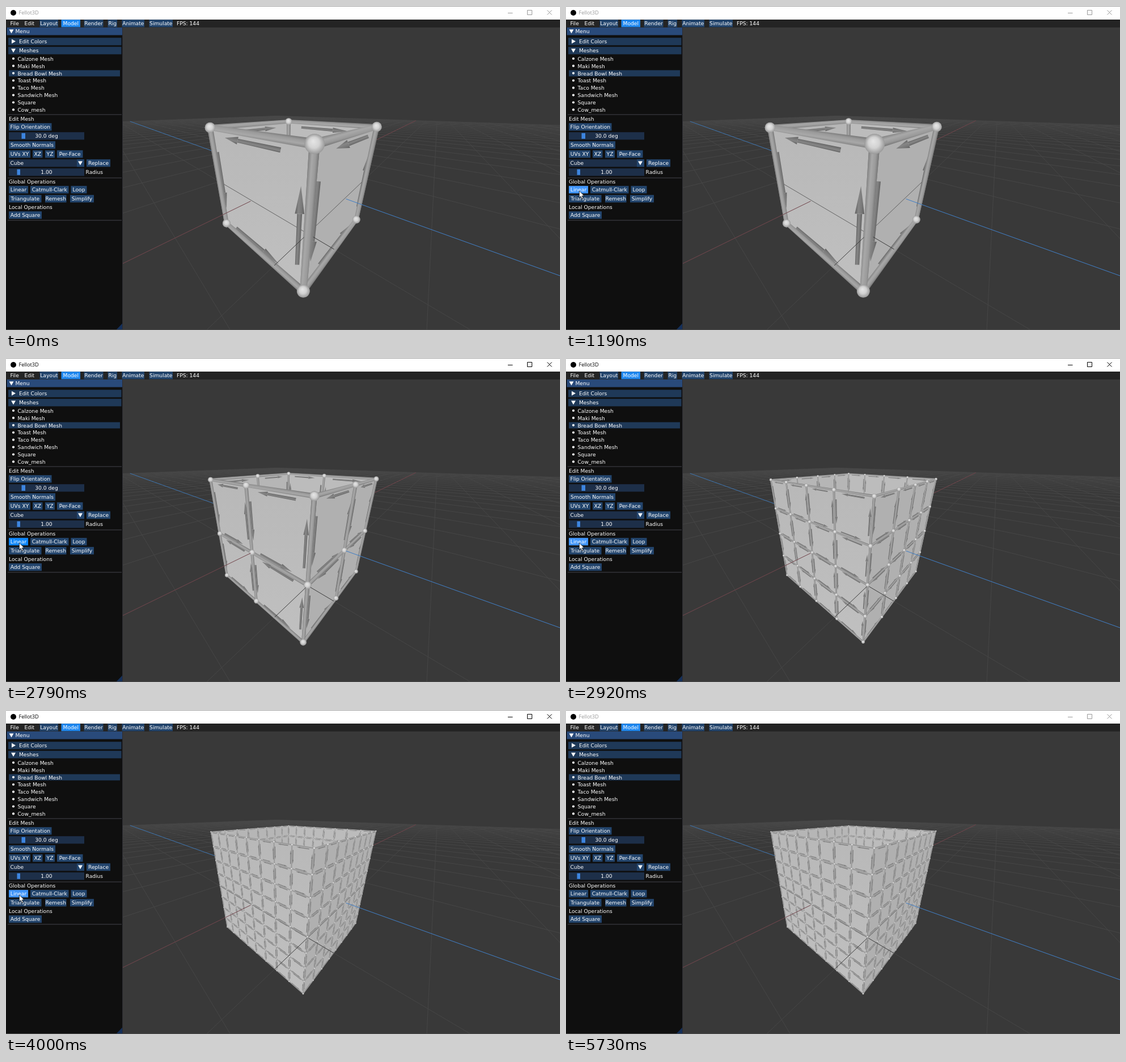
An HTML page with a canvas that plays this animation: 977 by 573 pixels, repeating every 5790 ms.

```html
<!DOCTYPE html>
<html lang="en">
<head>
<meta charset="utf-8">
<title>Mesh editor</title>
<style>
html, body { margin: 0; width: 100%; height: 100%; overflow: hidden; background: #393939; }
canvas { display: block; }
</style>
</head>
<body>
<canvas id="stage" width="977" height="573"></canvas>
<script>
const W = 977, H = 573, LOOP = 5790;
const view = document.getElementById('stage').getContext('2d');
let g = view;

// ---------- projection ----------
const ORIGIN = [507.4, 308], A_END = [761, 184], B_END = [163, 184], UP_END = [489, 964];
const KA = -0.226, KB = -0.207, KH = -0.125, UNIT = 91.5, REACH = 25;

const depth = (a, b, h = 0) => 1 + KA * a + KB * b + KH * h;

function project(a, b, h = 0) {
  const d = depth(a, b, h);
  const at = i => (ORIGIN[i] + KA * a * A_END[i] + KB * b * B_END[i] + KH * h * UP_END[i]) / d;
  return { x: at(0), y: at(1), k: UNIT / d };
}

// Adds a floor line to the path, cut off in front of the camera.
function floorLine(a0, b0, a1, b1) {
  const near = 0.06, d0 = depth(a0, b0), d1 = depth(a1, b1);
  if (d0 < near && d1 < near) return;
  const cut = (near - d0) / (d1 - d0);
  const at = t => project(a0 + (a1 - a0) * t, b0 + (b1 - b0) * t);
  const p = at(d0 < near ? cut : 0), q = at(d1 < near ? cut : 1);
  g.moveTo(p.x, p.y);
  g.lineTo(q.x, q.y);
}

function strokeFloor(color, width, ...lines) {
  g.beginPath();
  lines.forEach(l => floorLine(...l));
  g.strokeStyle = color;
  g.lineWidth = width;
  g.stroke();
}

// ---------- solids ----------
function polygon(points, fill) {
  g.beginPath();
  points.forEach(p => g.lineTo(p.x, p.y));
  g.closePath();
  if (fill) { g.fillStyle = fill; g.fill(); }
}

const BAR = ['#808080', '#a8a8a8', '#9a9a9a', '#747474'];
const SHAFT = ['#606060', '#868686', '#787878', '#5e5e5e'];

// A round bar or cone between two projected points.
function bar(p, q, r0, r1, tones) {
  const dx = q.x - p.x, dy = q.y - p.y, len = Math.hypot(dx, dy) || 1;
  let nx = dy / len, ny = -dx / len;
  if (nx > 0) { nx = -nx; ny = -ny; }
  const w0 = r0 * p.k, w1 = r1 * q.k, w = Math.max(w0, w1);
  let fill = tones[2];
  if (w > 1.2) {
    const mx = (p.x + q.x) / 2, my = (p.y + q.y) / 2;
    fill = g.createLinearGradient(mx + nx * w, my + ny * w, mx - nx * w, my - ny * w);
    tones.forEach((c, i) => fill.addColorStop([0, 0.35, 0.7, 1][i], c));
  }
  const off = (o, s) => ({ x: o.x + nx * s, y: o.y + ny * s });
  polygon([off(p, w0), off(q, w1), off(q, -w1), off(p, -w0)], fill);
}

function ball(p, radius) {
  const r = Math.max(radius * p.k, 0.9);
  const shade = g.createRadialGradient(p.x - r * 0.15, p.y - r * 0.3, 0, p.x, p.y, r);
  shade.addColorStop(0, '#e6e6e6');
  shade.addColorStop(0.55, '#d2d2d2');
  shade.addColorStop(1, '#9a9a9a');
  g.beginPath();
  g.arc(p.x, p.y, r, 0, 7);
  g.fillStyle = shade;
  g.fill();
}

function arrow(at, s0, h0, s1, h1, size) {
  const neck = 0.7;
  const p = at(s0, h0), q = at(s1, h1);
  const m = at(s0 + (s1 - s0) * neck, h0 + (h1 - h0) * neck);
  bar(p, m, 0.027 * size, 0.027 * size, SHAFT);
  bar(m, q, 0.052 * size, 0, SHAFT);
}

// Each wall runs along s and h, both 0..1, following the rim direction.
const WALLS = {
  left: s => [1, 1 - 2 * s],
  backLeft: s => [1 - 2 * s, -1],
  backRight: s => [-1, 2 * s - 1],
  right: s => [2 * s - 1, 1]
};

function drawBox(level) {
  const n = 2 ** level, size = 1 / n;
  const grow = 0.989 + 0.011 * size, tall = (grow + 1) / 2;
  const wall = name => (s, h) => {
    const [a, b] = WALLS[name](s);
    return project(a * grow, b * grow, (2 * h - 1) * tall);
  };
  const corners = at => [at(0, 0), at(0, 1), at(1, 1), at(1, 0)];

  function arrows(at) {
    const lo = 0.06, hi = 0.94;
    for (let i = 0; i < n; i++) for (let j = 0; j < n; j++) {
      const cell = (s, h) => at((i + s) / n, (j + h) / n);
      arrow(cell, 0.2, hi, 0.775, hi, size);
      arrow(cell, hi, 0.8, hi, 0.225, size);
      arrow(cell, 0.8, lo, 0.225, lo, size);
      arrow(cell, lo, 0.2, lo, 0.775, size);
    }
  }

  function frame(at) {
    const r = 0.046 * size;
    for (let i = 0; i <= n; i++) for (let j = 0; j < n; j++) {
      bar(at(i / n, j / n), at(i / n, (j + 1) / n), r, r, BAR);
      bar(at(j / n, i / n), at((j + 1) / n, i / n), r, r, BAR);
    }
  }

  function knots(at) {
    for (let i = 0; i <= n; i++) for (let j = 0; j <= n; j++) ball(at(i / n, j / n), 0.086 * size);
  }

  const back = [wall('backLeft'), wall('backRight')], front = [wall('left'), wall('right')];
  polygon(corners(back[0]), '#b6b6b6');
  polygon(corners(back[1]), '#bcbcbc');
  [arrows, frame, knots].forEach(part => back.forEach(part));

  const [l, r] = front;
  const tint = g.createLinearGradient(0, 215, 0, 505);
  tint.addColorStop(0, '#b8b8b8');
  tint.addColorStop(1, '#c0c0c0');
  polygon(corners(l), tint);
  polygon(corners(r), '#b0b0b0');
  strokeFloor('#4c4c4c', 0.8, [1, -1, 1, 1], [-1, 1, 1, 1]);
  [arrows, frame, knots].forEach(part => front.forEach(part));

  // Floor lines passing in front of the box
  const gap = 1 + 0.07 * size;
  g.save();
  polygon([l(1, 1), l(0, 1), r(0, 1), r(0, 0), l(0, 0), l(1, 0)]);
  g.clip();
  strokeFloor('#3a3a3a', 1, [1, gap, 1, 4], [gap, 1, 4, 1]);
  g.restore();
}

function makeScene(level) {
  const c = document.createElement('canvas');
  c.width = W;
  c.height = H;
  g = c.getContext('2d');
  g.fillStyle = '#393939';
  g.fillRect(0, 0, W, H);
  const grid = [];
  for (let i = -REACH; i <= REACH; i++) grid.push([i, -REACH, i, REACH], [-REACH, i, REACH, i]);
  strokeFloor('#484848', 0.85, ...grid);
  strokeFloor('#70434a', 1, [-REACH, 0, -1, 0]);
  strokeFloor('#3c74b0', 1, [0, -REACH, 0, -1]);
  drawBox(level);
  strokeFloor('#70434a', 1, [1.02, 0, REACH, 0]);
  strokeFloor('#3d7dc6', 1, [0, 1.02, 0, REACH]);
  g = view;
  return c;
}

const scenes = [0, 1, 2, 3].map(makeScene);

// ---------- interface ----------
const BUTTON = '#23456d', HEADER = '#1f3958', FIELD = '#1d2f49', HOVER = '#4296fa', HELD = '#0f87fa';

function rect(x, y, w, h, color) {
  g.fillStyle = color;
  g.fillRect(x, y, w, h);
}

function label(text, x, y, align = 'left') {
  g.font = '9.15px "DejaVu Sans", sans-serif';
  g.textAlign = align;
  g.fillStyle = '#fff';
  g.fillText(text, x, y + 3.3);
}

const box = (x0, x1, y, color) => rect(x0, y - 6.8, x1 - x0, 13.2, color);

function button(text, x0, x1, y, color = BUTTON) {
  box(x0, x1, y, color);
  label(text, (x0 + x1) / 2, y, 'center');
}

function slider(text, y, grab, width) {
  button(text, 5, 138, y, FIELD);
  rect(grab, y - 5.2, width, 10, '#3d85e0');
}

function triangle(x, y, down) {
  const pts = down ? [[-4, -3], [4, -3], [0, 4]] : [[-3, -4], [-3, 4], [4, 0]];
  polygon(pts.map(([dx, dy]) => ({ x: x + dx, y: y + dy })), '#fff');
}

const rule = y => rect(3, y - 0.5, 201, 1, '#44444c');

function titleBar(active) {
  const ink = active ? '#000' : '#999';
  rect(0, 0, W, 24, '#fff');
  rect(0, 0, W, 1, '#a0a0a0');
  g.beginPath();
  g.arc(13, 12, 5, 0, 7);
  g.fillStyle = '#000';
  g.fill();
  g.font = '9.2px "Open Sans", sans-serif';
  g.textAlign = 'left';
  g.fillStyle = ink;
  g.fillText('Fellot3D', 22.5, 15.2);
  g.strokeStyle = ink;
  g.lineWidth = 1;
  g.beginPath();
  g.moveTo(885, 12.5); g.lineTo(893.5, 12.5);
  g.rect(919.5, 7.5, 8, 8);
  g.moveTo(954.5, 7.5); g.lineTo(962.5, 15.5);
  g.moveTo(962.5, 7.5); g.lineTo(954.5, 15.5);
  g.stroke();
}

function menuBar() {
  rect(0, 24, W, 14, '#242424');
  label('File', 7.5, 31);
  label('Edit', 32.5, 31);
  button('Layout', 59.5, 92, 31);
  button('Model', 97.5, 131, 31, '#1f88f0');
  button('Render', 137.5, 171.5, 31);
  button('Rig', 179.5, 196, 31);
  button('Animate', 204.5, 244, 31);
  button('Simulate', 252.5, 294, 31);
  label('FPS: 144', 301, 31);
}

const MESHES = ['Calzone', 'Maki', 'Bread Bowl', 'Toast', 'Taco', 'Sandwich'].map(m => m + ' Mesh')
  .concat('Square', 'Cow_mesh');

function panel(linearColor) {
  rect(0, 38, 205.5, 534, '#0f0f0f');
  rect(1.5, 38, 204, 13.5, '#294a7a');
  triangle(9.5, 44.5, true);
  label('Menu', 16.5, 45);
  box(4, 203.5, 63, HEADER);
  triangle(13, 62.5, false);
  label('Edit Colors', 23, 63);
  box(4, 203.5, 79, HEADER);
  triangle(13, 78.5, true);
  label('Meshes', 23, 79);
  rect(5, 113.5, 196, 11, HEADER);
  MESHES.forEach((name, i) => {
    const y = 93.4 + i * 12.92;
    g.beginPath();
    g.arc(13, y - 0.4, 2.1, 0, 7);
    g.fillStyle = '#fff';
    g.fill();
    label(name, 20.5, y);
  });
  rule(192);
  label('Edit Mesh', 5, 199.5);
  button('Flip Orientation', 5, 80.5, 214);
  slider('30.0 deg', 230, 27.5, 6.5);
  button('Smooth Normals', 5, 87, 246);
  button('UVs XY', 5, 43, 262);
  button('XZ', 47, 64.5, 262);
  button('YZ', 69, 86, 262);
  button('Per-Face', 90, 135.5, 262);
  box(5, 138, 278, FIELD);
  box(125, 138, 278, BUTTON);
  triangle(131, 277.5, true);
  label('Cube', 7.5, 278);
  button('Replace', 142, 184, 278);
  slider('1.00', 294, 19.5, 5.5);
  label('Radius', 140.5, 294);
  rule(304);
  label('Global Operations', 5, 311);
  button('Linear', 5, 39, 325, linearColor);
  button('Catmull-Clark', 43, 110.5, 325);
  button('Loop', 114.5, 142.5, 325);
  button('Triangulate', 5, 62.5, 341);
  button('Remesh', 69, 106.5, 341);
  button('Simplify', 113, 155, 341);
  label('Local Operations', 5, 356);
  button('Add Square', 5, 63, 370);
  rule(379);
  polygon([{ x: 205.5, y: 561 }, { x: 205.5, y: 572 }, { x: 195, y: 572 }], '#15305a');
  rect(205, 38, 1, 534, '#2c2c33');
}

// ---------- pointer ----------
const PATH = [
  [270, 796, 540], [400, 722, 478], [530, 634, 400], [670, 450, 366], [800, 270, 346],
  [930, 130, 336], [1060, 50, 330], [1190, 23, 327], [4400, 90, 346], [4530, 400, 420],
  [4660, 690, 478], [4790, 814, 499], [4930, 900, 524], [5060, 948, 541], [5200, 948, 543],
  [5330, 948, 544]
];

function pointerAt(t) {
  if (t < 270 || t >= 5460) return null;
  const [, x, y] = PATH.filter(p => p[0] <= t).pop();
  return { x, y };
}

function drawPointer({ x, y }) {
  const shape = [[0, 0], [0, 12], [2.8, 9.6], [4.8, 14], [6.8, 13.1], [4.9, 8.8], [8.7, 8.7]];
  polygon(shape.map(([dx, dy]) => ({ x: x + dx + 0.4, y: y + dy })), '#fff');
  g.strokeStyle = '#000';
  g.lineWidth = 0.7;
  g.stroke();
}

// ---------- timeline ----------
const PRESSES = [1590, 2790, 3870], HOLD = 130;

function draw(t) {
  const level = PRESSES.filter(p => t >= p + HOLD).length;
  const held = PRESSES.some(p => t >= p && t < p + HOLD);
  const tip = pointerAt(t);
  const over = tip && tip.x > 5 && tip.x < 39 && tip.y > 318 && tip.y < 332;
  g.drawImage(scenes[level], 0, 0);
  titleBar(t >= 1590 && t < 5730);
  menuBar();
  panel(held ? HELD : over ? HOVER : BUTTON);
  rect(0, 572, W, 1, '#4a4a4a');
  if (tip) drawPointer(tip);
}

const start = performance.now();
function tick() {
  draw((performance.now() - start) % LOOP);
  requestAnimationFrame(tick);
}
tick();
</script>
</body>
</html>
```
